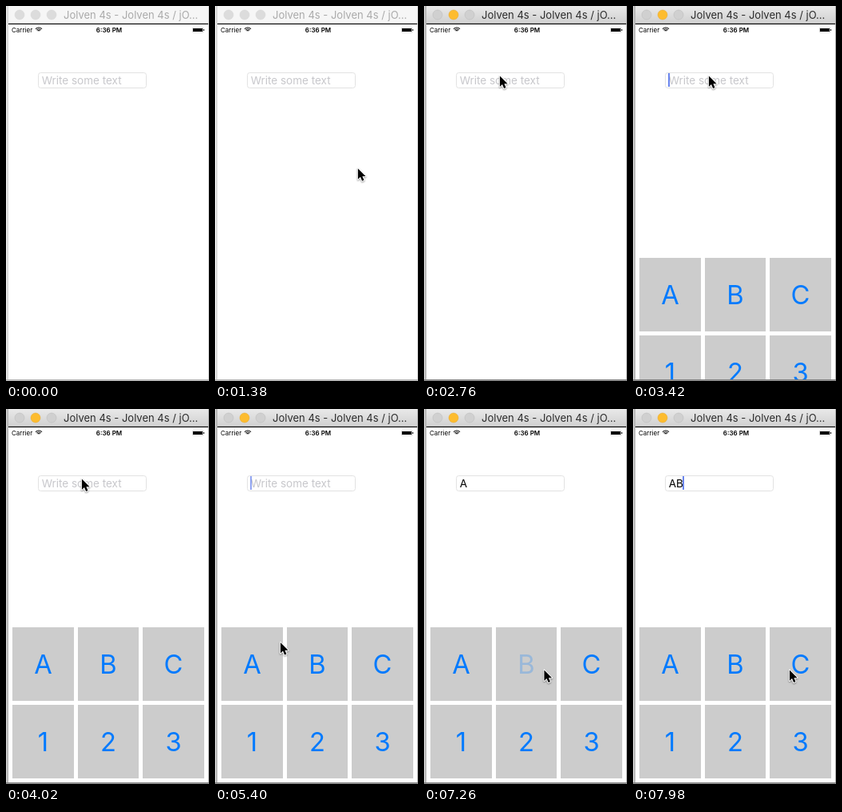
An HTML page with a canvas for the animation above (8 s loop, 254 px wide and 469 px high).

```html
<!DOCTYPE html>
<html lang="en">
<head>
<meta charset="utf-8">
<title>Custom keyboard demo</title>
<style>
html, body { margin: 0; width: 100%; height: 100%; overflow: hidden; background: #fff; }
canvas { display: block; }
</style>
</head>
<body>
<canvas id="stage" width="254" height="469"></canvas>
<script>
const ctx = document.getElementById('stage').getContext('2d');
const LOOP = 8000, STEP = 60;
const FONT = 'Inter, "Liberation Sans", sans-serif';
const ACTIVATE = 2760, FOCUS = 3300;

const presses = [
  { key: 'A', down: 6360, up: 6540 },
  { key: 'B', down: 7200, up: 7560 }
];

// The pointer enters at the right, visits the field, then the keys.
const entry = { x: 246, y: 315 };
const moves = [
  { from: 1200, to: 1980, x: 122, y: 109 },
  { from: 1980, to: 2580, x: 94.5, y: 87 },
  { from: 4740, to: 5400, x: 81.5, y: 291.5 },
  { from: 5400, to: 5520, x: 64, y: 300 },
  { from: 5700, to: 6000, x: 58, y: 310.5 },
  { from: 6660, to: 7140, x: 150, y: 326 },
  { from: 7500, to: 7980, x: 195.5, y: 326 }
];

const clamp = v => Math.min(1, Math.max(0, v));
const easeOut = k => 1 - (1 - k) ** 3;

function pointerAt(t) {
  return moves.reduce((p, m) => {
    const k = easeOut(clamp((t - m.from) / (m.to - m.from)));
    return { x: p.x + (m.x - p.x) * k, y: p.y + (m.y - p.y) * k };
  }, entry);
}

// Solid right after an edit, then a soft blink
function caretAlpha(sinceEdit) {
  if (sinceEdit < 0) return 0;
  return clamp(0.8 + 2 * Math.cos(2 * Math.PI * Math.max(0, sinceEdit - 390) / 980));
}

// Dims while pressed and recovers after release
function keyAlpha(key, t) {
  const press = presses.find(p => p.key === key);
  if (!press || t < press.down) return 1;
  return 0.25 + 0.75 * clamp((t - press.up) / 300) ** 2;
}

function box(x, y, w, h, color) {
  ctx.fillStyle = color;
  ctx.fillRect(x, y, w, h);
}

function label(text, x, y, size, color, align = 'left', weight = 400) {
  ctx.font = `${weight} ${size}px ${FONT}`;
  ctx.textAlign = align;
  ctx.fillStyle = color;
  ctx.fillText(text, x, y);
}

function gradient(x0, y0, x1, y1, from, to) {
  const g = ctx.createLinearGradient(x0, y0, x1, y1);
  g.addColorStop(0, from);
  g.addColorStop(1, to);
  return g;
}

function drawWindow(active) {
  box(0, 0, 254, 469, '#fff');
  box(0, 0, 3, 469, active
    ? gradient(0, 0, 3, 0, '#d8d8d8', '#a8a8a8')
    : gradient(0, 0, 3, 0, '#f0f0f0', '#cfcfcf'));
  box(253, 0, 1, 469, active ? '#aaa' : '#cfcfcf');
  box(0, 467, 254, 2, active
    ? gradient(0, 467, 0, 469, '#777', '#999')
    : gradient(0, 467, 0, 469, '#aaa', '#c4c4c4'));
  box(3, 0, 250, 22, active ? gradient(0, 0, 0, 22, '#e9e9e9', '#d0d0d0') : '#f6f6f6');
  box(3, 21, 250, 1, active ? '#b4b4b4' : '#d4d4d4');
  box(3, 22, 250, 1, '#000');
  [17, 37, 57].forEach((x, i) => {
    const minimize = active && i === 1;
    ctx.beginPath();
    ctx.arc(x, 11, 6, 0, Math.PI * 2);
    ctx.fillStyle = minimize ? '#fdbc2f' : active ? '#d0d0d0' : '#dcdcdc';
    ctx.fill();
    ctx.lineWidth = 0.5;
    ctx.strokeStyle = minimize ? '#e5a72c' : active ? '#b9b9b9' : '#d4d4d4';
    ctx.stroke();
  });
  label('Jolven 4s - Jolven 4s / jO...', 72, 16, 13, active ? '#2c2c2c' : '#aaa');
}

function drawStatusBar() {
  label('Carrier', 7, 33, 8, '#000');
  label('6:36 PM', 129, 33, 8, '#000', 'center', 600);
  ctx.strokeStyle = ctx.fillStyle = '#000';
  ctx.lineWidth = 1.1;
  for (const r of [2, 3.6, 5.6]) {
    ctx.beginPath();
    ctx.arc(41, 32.6, r, -Math.PI * 0.75, -Math.PI * 0.25);
    ctx.stroke();
  }
  ctx.lineWidth = 0.5;
  ctx.strokeStyle = 'rgba(0,0,0,0.35)';
  ctx.beginPath();
  ctx.roundRect(233.5, 27, 13.5, 6, 1);
  ctx.stroke();
  box(234, 28, 12, 4, '#000');
  box(247, 29, 1, 2, '#000');
}

function drawField(t) {
  ctx.beginPath();
  ctx.roundRect(40.5, 83.5, 135, 19, 3);
  ctx.lineWidth = 1;
  ctx.strokeStyle = '#e2e2e2';
  ctx.stroke();
  const typed = presses.filter(p => t >= p.up);
  const text = typed.map(p => p.key).join('');
  label(text || 'Write some text', 44.7, 98, 13.5, text ? '#000' : '#c7c7cb');
  const lastEdit = typed.length ? typed[typed.length - 1].up : FOCUS;
  ctx.globalAlpha = caretAlpha(t - lastEdit);
  box(Math.floor(44.4 + ctx.measureText(text).width), 84, 2, 17, '#6b86ee');
  ctx.globalAlpha = 1;
}

function drawKeyboard(t) {
  if (t < FOCUS) return;
  // Critically damped spring
  const s = 18.26 * (t - FOCUS + 40) / 1000;
  const shift = Math.round(200 * (1 + s) * Math.exp(-s));
  ctx.save();
  ctx.beginPath();
  ctx.rect(3, 23, 250, 444);
  ctx.clip();
  ctx.translate(0, shift);
  box(3, 268, 250, 200, '#fff');
  [...'ABC123'].forEach((key, i) => {
    const left = 8 + 81.5 * (i % 3), x = Math.round(left);
    const w = Math.round(left + 76.6) - x;
    const y = 273 + 97 * Math.floor(i / 3);
    box(x, y, w, 92, '#ccc');
    ctx.globalAlpha = keyAlpha(key, t);
    label(key, x + w / 2, y + 57.6, 32.7, '#007aff', 'center');
    ctx.globalAlpha = 1;
  });
  ctx.restore();
}

function drawPointer(t) {
  if (t < moves[0].from) return;
  const { x, y } = pointerAt(t);
  ctx.save();
  ctx.translate(x + 0.4, y + 0.4);
  ctx.lineJoin = 'round';
  ctx.lineWidth = 2;
  ctx.strokeStyle = '#fff';
  ctx.fillStyle = '#000';
  const arrow = new Path2D('M0 0V13.5L3.1 10.7L5.2 15.6L7.6 14.6L5.5 9.8H9.7Z');
  ctx.shadowColor = 'rgba(0,0,0,0.4)';
  ctx.shadowBlur = 2;
  ctx.shadowOffsetY = 1;
  ctx.stroke(arrow);
  ctx.shadowColor = 'transparent';
  ctx.fill(arrow);
  ctx.restore();
}

const start = performance.now();
function frame() {
  const elapsed = (performance.now() - start) % LOOP;
  const t = Math.floor(elapsed / STEP) * STEP;
  drawWindow(t >= ACTIVATE);
  drawStatusBar();
  drawField(t);
  drawKeyboard(t);
  drawPointer(t);
  requestAnimationFrame(frame);
}
frame();
</script>
</body>
</html>
```
